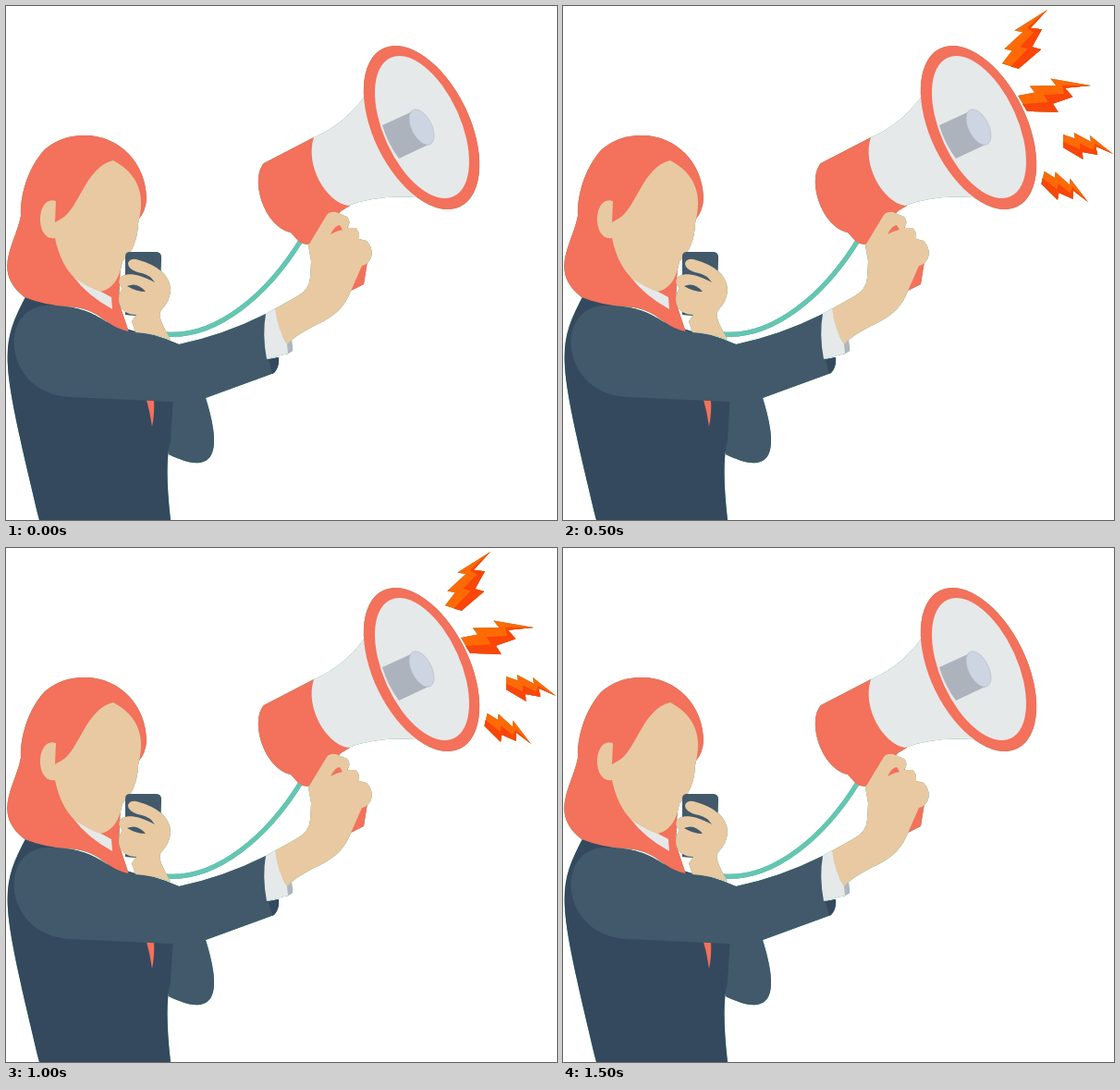
Write an HTML page that moves like this. It is 596 px wide and 556 px high and loops after 1600 ms.

```html
<!DOCTYPE html>
<html lang="en">
<head>
<meta charset="utf-8">
<title>Megaphone announcement</title>
<style>
  html, body { margin: 0; width: 100%; height: 100%; overflow: hidden; background: #fff; }
  svg { display: block; width: 596px; height: 556px; }
  .rim { filter: drop-shadow(0 0 .5px #2f9e6b); }
  .coral { fill: #f4715b; }
  .skin { fill: #e8c9a2; }
  .light { fill: #e6e9e9; }
  .navy { fill: #34495e; }
  .slate { fill: #42596b; }
</style>
</head>
<body>
<svg viewBox="0 0 596 556">
  <defs>
    <!-- Full-size bolt with its tip at 0,0 -->
    <g id="bolt">
      <path fill="#ff6a05" d="M0 0L-64 20-51 26-89 46-77 52-99 69-74 85-28 63-42 55-18 30-36 23Z"/>
      <path fill="#fb4509" d="M0 0L-42 21-33 32-62 49-50 56-86 78-74 85-28 63-42 55-18 30-36 23Z"/>
    </g>
  </defs>

  <g id="bolts" class="rim"></g>

  <g class="rim">
    <g id="megaphone">
      <path fill="none" stroke="#64c6b3" stroke-width="5" d="M172 355C228 360 284 311 320 252"/>
      <path class="coral" d="M333 142L279 170C264 186 278 238 308 245L317 255Q324 260 333 256L362 222 372 216 350 160Z"/>
      <path class="coral" d="M350 236H368L391 276 387 301 373 308Z"/>
      <path class="light" d="M333 142C355 133 377 115 390 94L445 207Q400 204 370 216C346 212 323 172 333 142Z"/>
      <ellipse class="coral" rx="52" ry="95.2" transform="translate(449.5 131.5) rotate(-26)"/>
      <ellipse class="light" rx="41.7" ry="82.4" transform="translate(450 131) rotate(-24.4)"/>
      <path fill="#acb3bd" d="M407 129L442 113 459 149 425 165Q413 149 407 129Z"/>
      <ellipse fill="#ccd5e1" stroke="#b3bcc8" stroke-width=".6" rx="10.9" ry="20.8" transform="translate(449.5 131) rotate(-26.5)"/>
    </g>

    <g id="body">
      <path class="slate" d="M170 426L216 424C236 488 223 508 176 485Z"/>
      <path class="navy" d="M22 313C-8 370-6 380 36 556H178Q171 495 178 470L181 420 187 366 133 350Z"/>
      <path class="coral" d="M152 426H160Q161 440 158 455Q156 440 152 426Z"/>
    </g>

    <g id="head">
      <path class="coral" d="M84 140C122 139 152 170 152 209Q151 222 144 230L124 277 122 320 133 353C106 347 103 326 65 325Q40 323 20 315C-16 287 10 258 16 227C15 203 25 173 42 155Q60 140 84 140Z"/>
      <path class="light" d="M73 293L114 315 115 328Q88 313 73 293Z"/>
      <path class="skin" d="M116 167C86 174 79 220 60 230L53 234 54 211C32 204 31 255 53 251Q59 280 75 295Q90 305 102 309C116 306 123 294 126 276Q142 262 143 235C151 205 144 182 116 167Z"/>
    </g>

    <g id="sleeve">
      <path class="slate" d="M133 352Q160 353 187 366Q235 356 281 333L284 383 295 380Q296 391 290 397L216 424Q200 428 178 428L70 423C-4 420-10 324 46 324C100 324 104 346 133 352Z"/>
      <path class="navy" d="M284 382L295 380Q296 391 288 398Z"/>
    </g>

    <g id="phone-hand">
      <path class="slate" d="M134 266H162Q168 266 168 272L167 298 142 335 129 334V271Q129 266 134 266Z"/>
      <path class="skin" d="M132 278Q134 273 141 274Q178 284 178 308Q177 320 168 329C164 335 168 342 178 361Q160 354 140 353L136 341 141 334C122 334 118 316 126 305C116 297 126 280 161 299Q156 291 147 289Q132 286 132 278Z"/>
      <path class="slate" d="M131 303Q142 298 151 309Q141 309 131 303Z"/>
    </g>

    <g id="raised-hand">
      <path fill="#b0b5bf" d="M301 366L309 362 310 373 303 377Z"/>
      <path class="skin" d="M290 328L315 314Q328 307 329 294L330 276 327 259 347 226Q350 222 357 223L369 228Q374 234 369 240L378 240Q383 244 382 252L390 254C400 264 396 279 385 281L374 306C360 345 330 340 304 366L296 352Z"/>
      <path class="coral" d="M351 247Q356 237 361 237L364 242Q358 243 351 247Z"/>
      <path class="light" d="M281 333L291 327Q294 351 304 366L305 376 282 382Q277 355 281 333Z"/>
    </g>
  </g>
</svg>
<script>
  const bolt = (x, y, turn, size) =>
    `<use href="#bolt" transform="translate(${x} ${y}) rotate(${turn}) scale(${size})"/>`;

  const bursts = {
    A: bolt(507, 3, -15, .63) + bolt(588, 25, 0, 1) + bolt(592, 129, 27, .66),
    B: bolt(524, 4, -15, .63) + bolt(571, 86, 27, .66) + bolt(595, 160, 56, .48) + bolt(568, 212, 70, .48),
    "-": "",
  };
  // One letter per beat; "-" is silence
  const rhythm = "-ABA-BA-BABBABA-";
  const beat = 100;

  const layer = document.getElementById("bolts");
  const start = performance.now();
  let shown = "-";

  function tick() {
    const elapsed = performance.now() - start;
    const next = rhythm[Math.floor(elapsed / beat) % rhythm.length];
    if (next !== shown) layer.innerHTML = bursts[shown = next];
    requestAnimationFrame(tick);
  }
  tick();
</script>
</body>
</html>
```
